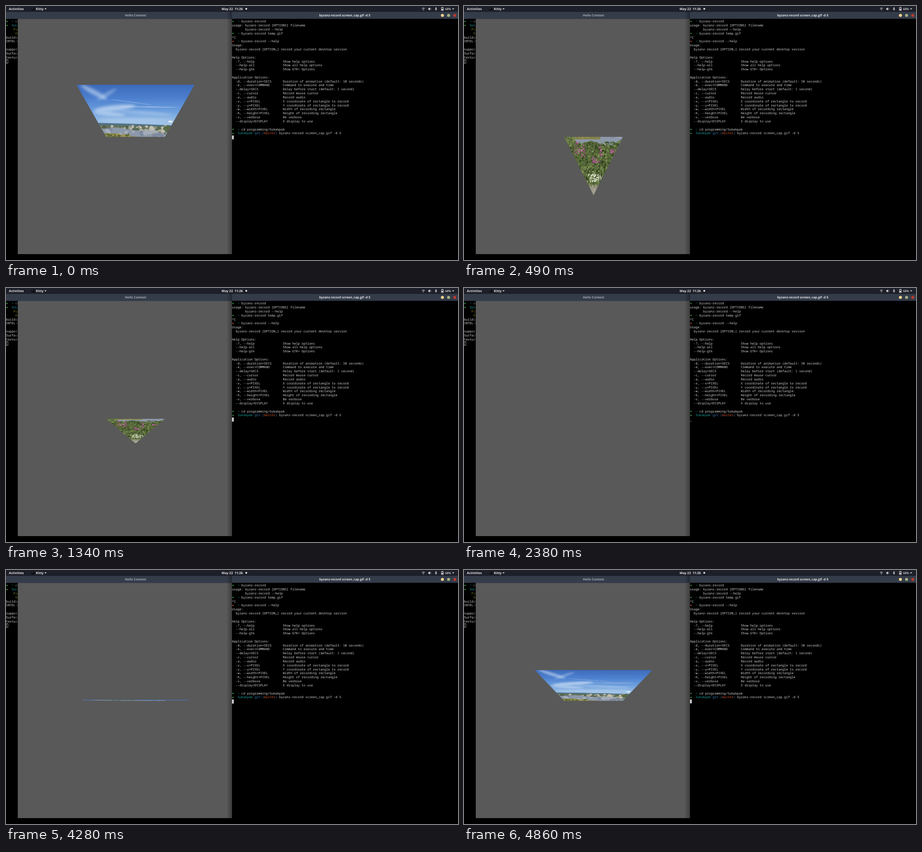
An HTML page with a canvas that plays this animation: 998 by 561 pixels, repeating every 4890 ms.

```html
<!DOCTYPE html>
<html lang="en">
<head>
<meta charset="utf-8">
<title>Hello Context</title>
<style>
  html, body { margin: 0; width: 100%; height: 100%; overflow: hidden; background: #000; }
  canvas { display: block; }
</style>
</head>
<body>
<canvas id="stage" width="998" height="561"></canvas>
<script>
const ctx = document.getElementById('stage').getContext('2d');
const MONO = '6.93px "Noto Sans Mono", monospace';
const CELL = 4.16, ROW = 8.83, TOP = 29.5;
const WHITE = '#d6d6d6', GREEN = '#3fae4a', RED = '#d2522f', CYAN = '#1c9fa0', BLUE = '#3f83c4', OLIVE = '#8f9a1e';
const LOOP = 4890, SIZE = 260, LEFT = 156, MIDDLE = 288.5;

function rect(c, color, x, y, w, h) {
  c.fillStyle = color;
  c.fillRect(x, y, w, h);
}

function disc(c, color, x, y, rx, ry = rx, turn = 0) {
  c.fillStyle = color;
  c.beginPath();
  c.ellipse(x, y, rx, ry, turn, 0, 7);
  c.fill();
}

function shape(c, color, ...points) {
  c.fillStyle = color;
  c.beginPath();
  for (let i = 0; i < points.length; i += 2) c.lineTo(points[i], points[i + 1]);
  c.fill();
}

function gradient(c, x0, y0, x1, y1, ...colors) {
  const g = c.createLinearGradient(x0, y0, x1, y1);
  colors.forEach((color, i) => g.addColorStop(i / (colors.length - 1), color));
  return g;
}

function label(text, x, y, { color = '#e6e6e6', size = 7.1, weight = 700, align = 'left' } = {}) {
  ctx.font = `${weight} ${size}px "Open Sans", sans-serif`;
  ctx.textAlign = align;
  ctx.fillStyle = color;
  ctx.fillText(text, x, y);
}

function mono(text, x, row, col = 0, color = WHITE) {
  ctx.font = MONO;
  ctx.textAlign = 'left';
  ctx.fillStyle = color;
  ctx.fillText(text, x + col * CELL, TOP + row * ROW + 6.7);
}

function prompt(x, row, command, arrow = GREEN, inRepo = false) {
  const y = TOP + row * ROW + 4.6;
  rect(ctx, arrow, x + 0.4, y - 0.5, 2.2, 1);
  shape(ctx, arrow, x + 1.9, y - 1.9, x + 4, y, x + 1.9, y + 1.9);
  mono(inRepo ? 'Sukakpak' : '~', x, row, 3, CYAN);
  if (inRepo) {
    mono('git:(', x, row, 12, BLUE);
    mono('master', x, row, 17, RED);
    mono(')', x, row, 23, BLUE);
  }
  mono(command, x, row, inRepo ? 25 : 5);
}

function drawTray() {
  ctx.lineWidth = 0.9;
  ctx.strokeStyle = '#c9cbd0';
  for (const r of [1.6, 3.3, 5]) {
    ctx.beginPath();
    ctx.arc(921.5, 9, r, -2.3, -0.84);
    ctx.stroke();
  }
  disc(ctx, '#c9cbd0', 921.5, 9, 0.8);
  shape(ctx, '#e0e0e0', 932.5, 5, 934, 5, 936, 3, 936, 10, 934, 8, 932.5, 8);
  ctx.beginPath();
  ctx.arc(935.5, 6.5, 2.6, -0.9, 0.9);
  ctx.stroke();
  rect(ctx, '#e0e0e0', 948.4, 3, 2, 4.5);
  ctx.beginPath();
  ctx.arc(949.4, 6.3, 2.2, 0, Math.PI);
  ctx.stroke();
  rect(ctx, '#e0e0e0', 949, 8.5, 0.9, 1.7);
  rect(ctx, '#e0e0e0', 962.3, 2.3, 2.4, 1.2);
  ctx.strokeStyle = '#e0e0e0';
  ctx.strokeRect(961.2, 3.6, 4.6, 6.4);
  rect(ctx, '#e0e0e0', 962.2, 6, 2.6, 3.2);
}

function drawDesktop() {
  ctx.textRendering = 'geometricPrecision';
  rect(ctx, '#000', 0, 0, 998, 561);
  rect(ctx, '#1d1f29', 0, 0, 998, 13);
  rect(ctx, '#343c4a', 0, 13, 998, 15.5);

  label('Activities', 6.3, 9);
  rect(ctx, '#090a0d', 56.3, 3.3, 6, 6);
  rect(ctx, '#a9abb0', 57.3, 4.6, 2, 0.9);
  label('Kitty', 66, 9);
  label('May 22  11:26', 476, 9);
  disc(ctx, '#e8e8e8', 530.5, 6.3, 2);
  drawTray();
  label('68%', 969.5, 8.8, { size: 6.5, weight: 600 });
  for (const x of [87.3, 987.3]) shape(ctx, '#dcdcdc', x - 2.4, 5.2, x + 2.4, 5.2, x, 8);

  label('byzanz-record screen_cap.gif -d 5', 748, 23.3, { size: 6.95, align: 'center' });
  disc(ctx, '#f4d58d', 963.6, 20.7, 3.3);
  disc(ctx, '#a5b183', 977.2, 20.7, 3.3);
  disc(ctx, '#bb3a30', 990.8, 20.7, 3.3);

  prompt(0, 0, 'cd');
  prompt(0, 1, '', GREEN, true);
  mono('Finished', 0, 2, 4, OLIVE);
  mono('Running', 0, 3, 5, OLIVE);
  ['building', 'INTEL-OK', '', 'support', 'Surface', 'texture'].forEach((s, i) => mono(s, 0, i + 4));
  ctx.strokeStyle = '#b8b8b8';
  ctx.lineWidth = 0.8;
  ctx.strokeRect(0.5, 118.4, 3.6, 8);
  rect(ctx, gradient(ctx, 18, 0, 26, 0, '#0000', '#0008'), 18, 28, 8, 520);

  // Preview window
  rect(ctx, '#343c4a', 26, 13, 473, 15.5);
  label('Hello Context', 286, 23.3, { color: '#a6abb4', size: 6.95, align: 'center' });
  rect(ctx, '#595959', 26, 28.5, 473, 519.5);
  rect(ctx, gradient(ctx, 487, 0, 499, 0, '#0000', '#0005'), 487, 13, 12, 535);
  rect(ctx, '#000', 499, 28.5, 499, 533);

  const X = 499;
  prompt(X, 0, 'byzanz-record');
  mono('usage: byzanz-record [OPTIONS] filename', X, 1);
  mono('byzanz-record --help', X, 2, 7);
  prompt(X, 3, 'byzanz-record temp.gif');
  mono('^C', X, 4);
  prompt(X, 5, 'byzanz-record --help', RED);
  mono('Usage:', X, 6);
  mono('byzanz-record [OPTION…] record your current desktop session', X, 7, 2);
  mono('Help Options:', X, 9);
  mono('Application Options:', X, 14);
  const options = (row, list) => list.forEach(([flag, help], i) => {
    mono(flag, X, row + i, 2);
    mono(help, X, row + i, 27);
  });
  options(10, [
    ['-?, --help', 'Show help options'],
    ['--help-all', 'Show all help options'],
    ['--help-gtk', 'Show GTK+ Options'],
  ]);
  options(15, [
    ['-d, --duration=SECS', 'Duration of animation (default: 10 seconds)'],
    ['-e, --exec=COMMAND', 'Command to execute and time'],
    ['--delay=SECS', 'Delay before start (default: 1 second)'],
    ['-c, --cursor', 'Record mouse cursor'],
    ['-a, --audio', 'Record audio'],
    ['-x, --x=PIXEL', 'X coordinate of rectangle to record'],
    ['-y, --y=PIXEL', 'Y coordinate of rectangle to record'],
    ['-w, --width=PIXEL', 'Width of recording rectangle'],
    ['-h, --height=PIXEL', 'Height of recording rectangle'],
    ['-v, --verbose', 'Be verbose'],
    ['--display=DISPLAY', 'X display to use'],
  ]);
  prompt(X, 27, 'cd programming/Sukakpak');
  prompt(X, 28, 'byzanz-record screen_cap.gif -d 5', GREEN, true);
}

// Landscape cut to a downward triangle: sky, river valley, flowering meadow
function paintTexture() {
  const canvas = document.createElement('canvas');
  canvas.width = canvas.height = SIZE;
  const c = canvas.getContext('2d');
  let seed = 7;
  const random = () => (seed = seed * 16807 % 2147483647) / 2147483647;
  const scatter = (n, colors, x, y, w, h, r) => {
    for (let i = 0; i < n; i++) {
      disc(c, colors[i % colors.length], x + random() * w, y + random() * h,
        r * (0.5 + random()), r * (0.4 + random() * 0.6), random() * 3);
    }
  };

  c.beginPath();
  c.moveTo(0, 0);
  c.lineTo(SIZE, 0);
  c.lineTo(SIZE / 2, SIZE);
  c.clip();

  rect(c, gradient(c, 0, 0, 0, 98, '#3d6bbb', '#4c80cf', '#6d9fdd', '#a3c6e8'), 0, 0, SIZE, 104);
  c.filter = 'blur(3px)';
  disc(c, '#d5e4f688', 38, 18, 34, 6, 0.55);
  disc(c, '#d5e4f666', 66, 24, 26, 4, -0.6);
  disc(c, '#dce9f899', 84, 58, 46, 7, -0.12);
  disc(c, '#dce9f888', 72, 72, 36, 5, 0.1);
  disc(c, '#cfe1f666', 150, 70, 60, 4, 0.08);
  disc(c, '#cfe1f655', 130, 88, 80, 5);
  c.filter = 'blur(0.6px)';
  disc(c, '#d9e7f899', 160, 55, 66, 0.9, 0.02);
  disc(c, '#d9e7f866', 120, 43, 46, 0.8, 0.15);
  disc(c, '#eef3f8', 207, 92, 5, 2);
  c.filter = 'none';

  shape(c, '#4f7186', 40, 95, 130, 98, 220, 102, 220, 135, 40, 135);
  shape(c, '#63715e', 40, 100, 130, 102, 220, 105, 220, 135, 40, 135);
  scatter(50, ['#b9b8ab', '#526248', '#8d9683'], 50, 103, 165, 12, 4);
  shape(c, '#8d98a9', 50, 111, 90, 107, 130, 114, 200, 115, 200, 155, 60, 155);
  scatter(24, ['#c6c1b0', '#596a49', '#aaaa98'], 140, 106, 70, 14, 5);
  scatter(18, ['#a4acba', '#7e8a9f'], 65, 114, 125, 16, 6);
  shape(c, '#858247', 55, 121, 85, 122, 110, 128, 145, 131, 145, 136, 55, 136);
  scatter(24, ['#9b9355', '#59672f'], 60, 123, 65, 8, 3);

  shape(c, '#596a3c', 60, 131, 82, 134, 98, 147, 125, 139, 150, 148, 172, 149, 198, 132, 198, 260, 60, 260);
  scatter(1300, ['#2b3b1c', '#6f8447', '#495d2d', '#8f9d64', '#394a24'], 60, 142, 140, 100, 1.8);
  scatter(90, ['#55683a', '#7b8e53'], 64, 130, 26, 16, 1.7);
  for (const [x, y, w, h] of [[88, 140, 12, 28], [103, 148, 8, 26], [127, 176, 18, 14], [143, 150, 5, 24], [168, 158, 8, 8]]) {
    scatter(20, ['#c052a4', '#9d477f', '#cf72b5'], x, y, w, h, 1.5);
  }
  scatter(45, ['#f0f0e6', '#d9ddc9'], 119, 213, 29, 17, 1.5);
  rect(c, gradient(c, 0, 234, 0, 245, '#a29e9000', '#a29e90'), 100, 234, 60, 26);
  scatter(50, ['#b9b5a8', '#84836f'], 115, 237, 30, 20, 1);
  return canvas;
}

// Capture instants while the triangle shows
const TICKS = [0, 110, 200, 300, 390, 490, 590, 700, 790, 890, 980, 1080, 1170, 1250, 1340,
  1450, 1530, 1610, 1700, 4280, 4350, 4430, 4510, 4590, 4670, 4760, 4860];
const BLINKS = [390, 890, 1450, 1840, 2380, 2880, 3380, 3850, 4350, 4860];
const TURN = [[0, -28.7], [1170, 55], [1340, 65], [1700, 90], [4270, 270], [4590, 287.5], [4860, 301.5]];

function angleAt(time) {
  const i = Math.max(1, TURN.findIndex(([t]) => t >= time));
  const [[t0, a0], [t1, a1]] = [TURN[i - 1], TURN[i]];
  return (a0 + (a1 - a0) * (time - t0) / (t1 - t0)) * Math.PI / 180;
}

drawDesktop();
const texture = paintTexture();

function frame(now) {
  const time = now % LOOP;
  const angle = angleAt(TICKS.filter(t => t <= time).pop());
  const half = SIZE / 2, height = half * Math.cos(angle);

  rect(ctx, '#595959', LEFT - 2, MIDDLE - half - 2, SIZE + 4, SIZE + 4);
  // Only the front face is drawn, and depth clipping leaves one half of it
  if (height > 0.5) {
    const upper = Math.sin(angle) < 0;
    ctx.drawImage(texture, 0, upper ? 0 : half, SIZE, half,
      LEFT, upper ? MIDDLE - height : MIDDLE, SIZE, height);
  }

  const cursorOn = BLINKS.filter(t => t <= time).length % 2 === 0;
  rect(ctx, cursorOn ? '#cccccc' : '#000', 499, 286, 4, 8.5);
  requestAnimationFrame(frame);
}
requestAnimationFrame(frame);
</script>
</body>
</html>
```
